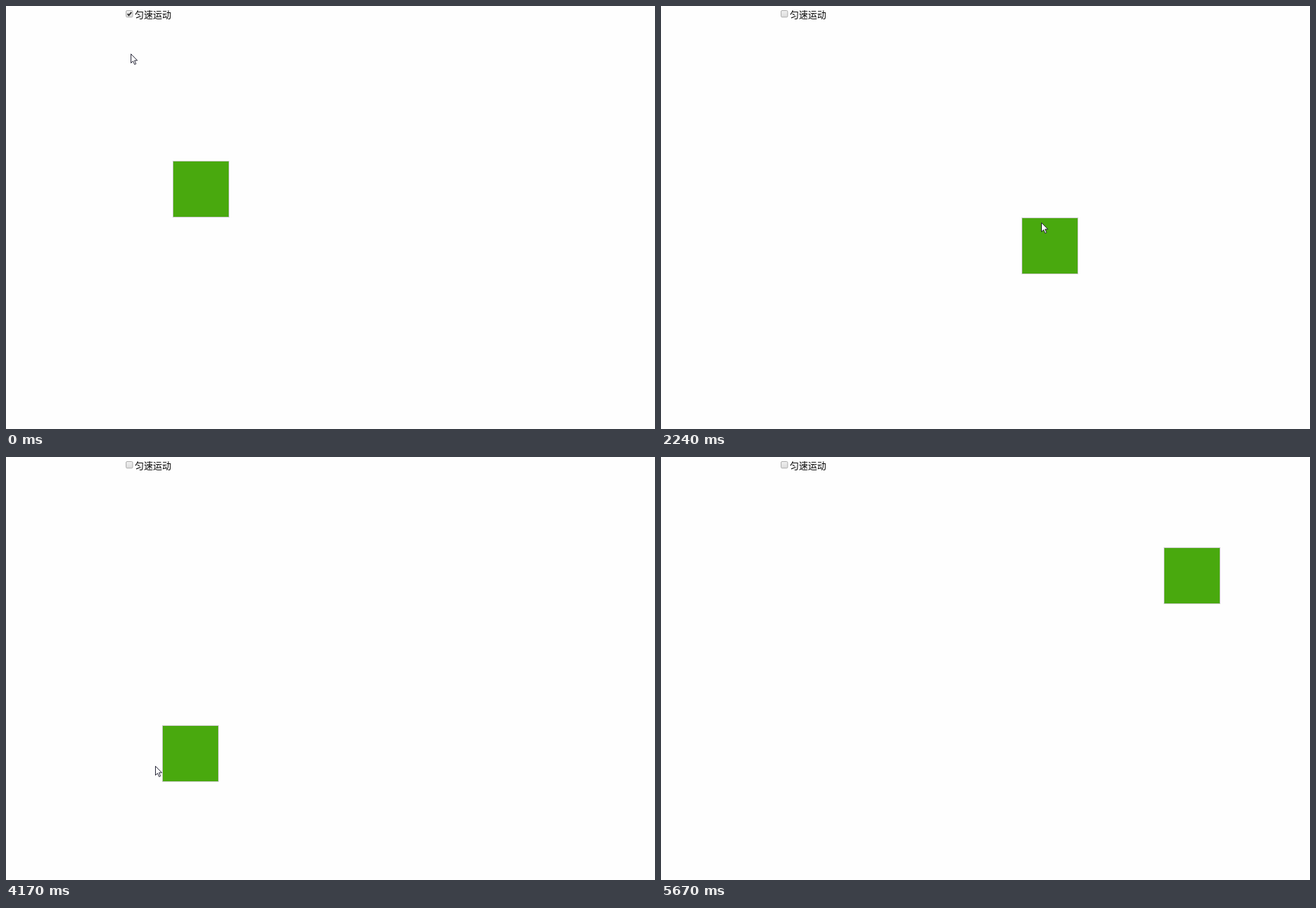
Write an HTML page that moves like this. It is 927x604 px and loops after 5.82 s.

```html
<!DOCTYPE html>
<html lang="zh">
<head>
<meta charset="utf-8">
<title>匀速运动</title>
<style>
  html, body { margin: 0; width: 100%; height: 100%; overflow: hidden; background: #fefefe; }
  #box, #cursor, #check, #label { position: absolute; left: 0; top: 0; }
  #box { width: 81px; height: 81px; box-sizing: border-box; background: #49a90e; border: 1px solid #ccc; }
  #cursor { width: 11px; height: 17px; overflow: visible; }
  #check { left: 171px; top: 6px; width: 11px; height: 11px; }
  #label { left: 184px; top: 2px; font: 13px/19px "Noto Sans CJK SC", "Noto Sans CJK", sans-serif; color: #000; white-space: nowrap; }
</style>
</head>
<body>
<svg id="check" viewBox="0 0 11 11">
  <defs>
    <linearGradient id="face" x2="0" y2="1">
      <stop stop-color="#f0f0f0"/><stop offset="1" stop-color="#dcdcdc"/>
    </linearGradient>
  </defs>
  <rect id="frame" x=".5" y=".5" width="9.4" height="9.4" rx="1.5" fill="url(#face)" stroke="#adadad"/>
  <path id="tick" d="M2.6 5.2 4.4 7.3 8.2 2.8" fill="none" stroke="#333" stroke-width="1.9"/>
</svg>
<div id="label">匀速运动</div>
<div id="box"></div>
<svg id="cursor" viewBox="0 0 11 17">
  <path d="M.5.5V13.4L3.5 10.6 5.7 15.5 7.7 14.6 5.6 9.8H9.6Z" fill="#fff" stroke="#1c1c2e" stroke-width=".95"/>
</svg>
<script>
const LOOP = 5820;
const el = id => document.getElementById(id);
const progress = (t, a, b) => Math.min(1, Math.max(0, (t - a) / (b - a)));
const smooth = p => p * p * (3 - 2 * p);

// The screen refreshes at an almost even pace: [start, end, refreshes]
const paces = [[0, 1820, 14], [1820, 2960, 8], [2960, 4170, 9], [4170, 5010, 6], [5010, 5670, 5], [5670, LOOP, 1]];
function refresh(t) {
  const [a, b, n] = paces.find(p => t < p[1]);
  const step = (b - a) / n;
  return a + Math.floor((t - a) / step) * step;
}

// Every 20 ms the box covers a tenth of the way left, rounded up
function chase(from, to, ms) {
  let gap = Math.abs(to - from);
  for (; ms >= 20 && gap > 0; ms -= 20) gap -= Math.ceil(gap / 10);
  return to - Math.sign(to - from) * gap;
}

// [click time, x, y]
const clicks = [[1640, 543, 309], [2820, 350, 143], [3870, 195, 440], [4750, 718, 129]];
function boxAt(t) {
  // Uniform motion while the option is on
  const p = progress(t, 0, 260);
  let x = Math.round(238 - 54 * p), y = Math.round(221 - 37 * p);
  for (const [at, tx, ty] of clicks) {
    x = chase(x, tx, t - at);
    y = chase(y, ty, t - at);
  }
  return [x, y];
}

// Strokes of the mouse: [start, end, x, y]
const strokes = [
  [0, 430, 178, 13], [950, 1040, 179, 17], [1040, 1380, 543, 309], [2500, 2670, 349, 142],
  [3250, 3490, 208, 239], [3490, 3766, 194, 441], [4050, 4170, 213, 441], [4170, 4530, 717, 129],
  [4880, 5010, 714, 148], [5010, 5480, 915, 590], [5540, 5670, 945, 620]
];
function cursorAt(t) {
  let x = 178, y = 68;
  for (const [a, b, tx, ty] of strokes) {
    const p = smooth(progress(t, a, b));
    x += (tx - x) * p;
    y += (ty - y) * p;
  }
  return [Math.round(x), Math.round(y)];
}

const place = (node, [x, y]) => node.style.transform = `translate(${x}px, ${y}px)`;

const start = performance.now();
function draw() {
  const t = refresh((performance.now() - start) % LOOP);
  place(el("box"), boxAt(t));
  place(el("cursor"), cursorAt(t));
  el("tick").style.display = t < 780 ? "" : "none";
  el("frame").setAttribute("stroke", t >= 650 && t < 1040 ? "#8c8c8c" : "#adadad");
  requestAnimationFrame(draw);
}
draw();
</script>
</body>
</html>
```
